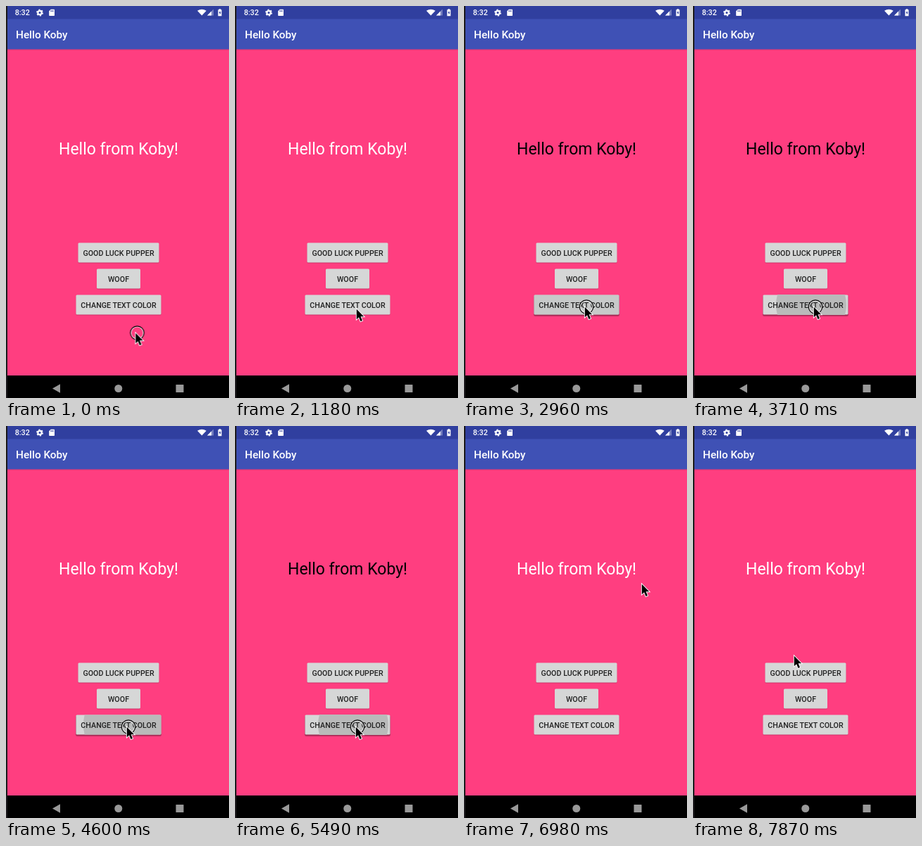
Write an HTML page that moves like this. It is 317 px wide and 557 px high and loops after 8 s.

```html
<!DOCTYPE html>
<html lang="en">
<head>
<meta charset="utf-8">
<title>Hello Koby</title>
<style>
  html, body { margin: 0; width: 100%; height: 100%; overflow: hidden; background: #1c1a1d; }
  svg { display: block; width: 317px; height: 557px; font-family: Roboto, sans-serif; }
  .medium { font-weight: 500; }
  .caption { font-size: 10.73px; font-weight: 500; fill: #222; text-anchor: middle; }
  .face { fill: #d6d7d7; }
  .shade { fill: #000; opacity: .2; }

  /* Every change is a hard cut on one shared 8 s clock. */
  .greeting, .cursor, .ring, .ripple, .lift { animation: 8s step-end infinite; }
  .greeting { animation-name: recolor; }
  .cursor { animation-name: wander; }
  .ring { animation-name: click; }
  .ripple { animation-name: spread; }
  .lift { animation-name: press; }

  @keyframes recolor {
    0%, 48.25%, 70.5% { fill: #fff; }
    37%, 59.375% { fill: #000; }
  }
  @keyframes click {
    0%, 22.125%, 35.125%, 46.375%, 57.5%, 68.625% { opacity: 1; }
    1.75%, 25.875%, 38.875%, 50%, 61.25%, 72.375% { opacity: 0; }
  }
  @keyframes press {
    0%, 38.875%, 50%, 61.25%, 72.375% { opacity: 0; }
    35.125%, 46.375%, 57.5%, 68.625% { opacity: .25; }
  }
  @keyframes spread {
    0%, 38.875%, 50%, 61.25%, 72.375% { r: 0px; opacity: 0; }
    35.125%, 46.375%, 68.625% { r: 50px; opacity: 1; }
    57.5% { r: 58px; opacity: 1; }
    37%, 48.25%, 59.375%, 70.5% { r: 75px; opacity: .5; }
  }
  @keyframes wander {
    0% { transform: translate(183.5px, 464px); }
    9.25% { transform: translate(183px, 462px); }
    11.125% { transform: translate(180px, 453px); }
    12.875% { transform: translate(176px, 441px); }
    14.75% { transform: translate(172px, 430px); }
    16.625%, 72.375% { transform: translate(171px, 427px); }
    74.25% { transform: translate(174px, 390px); }
    76.125% { transform: translate(182px, 260px); }
    78% { transform: translate(184px, 163px); }
    79.875% { transform: translate(164px, 128px); }
    81.75% { transform: translate(80px, 158px); }
    83.625% { transform: translate(68px, 214px); }
    85.375% { transform: translate(164px, 257px); }
    87.25% { transform: translate(252px, 224px); }
    89.125% { transform: translate(260px, 170px); }
    91% { transform: translate(164px, 128px); }
    92.75% { transform: translate(64px, 181px); }
    94.625% { transform: translate(112px, 246px); }
    96.5% { transform: translate(125px, 290px); }
    98.375%, 100% { transform: translate(143px, 326px); }
  }
</style>
</head>
<body>
<svg viewBox="0 0 317 557">
  <defs>
    <clipPath id="wide"><rect x="99.5" y="410.5" width="121" height="28" rx="1.5"/></clipPath>
    <linearGradient id="barShadow" x2="0" y2="1">
      <stop stop-opacity=".16"/><stop offset="1" stop-opacity="0"/>
    </linearGradient>
  </defs>

  <rect x="2" width="315" height="525" fill="#ff3e80"/>
  <rect x="2" y="61.5" width="315" height="2" fill="url(#barShadow)"/>
  <rect x="2" y="18" width="315" height="43.5" fill="#3f51b5"/>
  <rect x="2" width="315" height="18.5" fill="#303f9f"/>
  <rect x="2" y="525" width="315" height="32"/>

  <!-- Status bar -->
  <g fill="#fff">
    <text class="medium" x="12.7" y="13.3" font-size="10.73">8:32</text>
    <g fill="none" stroke="#fff">
      <circle cx="48" cy="9.5" r="2.7" stroke-width="2.2"/>
      <circle cx="48" cy="9.5" r="4.2" stroke-width="1.5" stroke-dasharray="2.2 2.198"/>
    </g>
    <path d="M61.2 7.3 63.8 4.7H68.2Q69 4.7 69 5.5V13.2Q69 14 68.2 14H62Q61.2 14 61.2 13.2Z"/>
    <path d="M63.8 6.2v2M65.5 6.2v2M67.2 6.2v2" stroke="#303f9f" stroke-width=".9"/>
    <path d="M272 6.8Q278.4 2.8 284.8 6.8L278.4 13.6Z"/>
    <path d="M295 4.5V13.5H286Z" opacity=".35"/>
    <path d="M292 7.5V13.5H286Z"/>
    <path d="M302.7 4.2h2.6v1h1.2v9h-5v-9h1.2Z"/>
    <path d="M304.5 6.5 302.6 10h1.2v2.6l1.8-3.5h-1.1Z" fill="#303f9f"/>
  </g>

  <text class="medium" x="14" y="46" font-size="15.3" fill="#fff">Hello Koby</text>
  <text class="greeting" x="160" y="210.5" font-size="23" text-anchor="middle" fill="#fff">Hello from Koby!</text>

  <!-- Buttons -->
  <rect class="shade" x="102.5" y="337.5" width="115" height="28" rx="1.5"/>
  <rect class="face" x="102.5" y="336.5" width="115" height="28" rx="1.5"/>
  <text class="caption" x="160" y="354.7">GOOD LUCK PUPPER</text>

  <rect class="shade" x="129" y="374.5" width="62" height="28" rx="1.5"/>
  <rect class="face" x="129" y="373.5" width="62" height="28" rx="1.5"/>
  <text class="caption" x="160" y="391.7">WOOF</text>

  <rect class="lift" x="99" y="411" width="122" height="30" rx="2.5" opacity="0"/>
  <rect class="shade" x="99.5" y="411.5" width="121" height="28" rx="1.5"/>
  <rect class="face" x="99.5" y="410.5" width="121" height="28" rx="1.5"/>
  <g clip-path="url(#wide)"><circle class="ripple" cx="168" cy="424.5" r="0" fill="#b9baba"/></g>
  <text class="caption" x="160" y="428.7">CHANGE TEXT COLOR</text>

  <!-- Navigation bar -->
  <g fill="#999">
    <path d="M66 543.5 77 537.2V549.8Z"/>
    <circle cx="159.8" cy="543.5" r="5.5"/>
    <rect x="241.5" y="538" width="11" height="11" rx=".6"/>
  </g>

  <g class="cursor">
    <g class="ring" fill="none">
      <circle cx="3" cy=".5" r="8.7" stroke="#fff" stroke-width="1.1"/>
      <circle cx="3" cy=".5" r="9.7" stroke="#000" stroke-width="1.2"/>
    </g>
    <path d="M.8 .8V15.2L4.1 12.2 6.5 18 9 17 6.6 11.3H11.2Z" stroke="#fff" stroke-width="1.8" paint-order="stroke"/>
  </g>
</svg>
</body>
</html>
```
